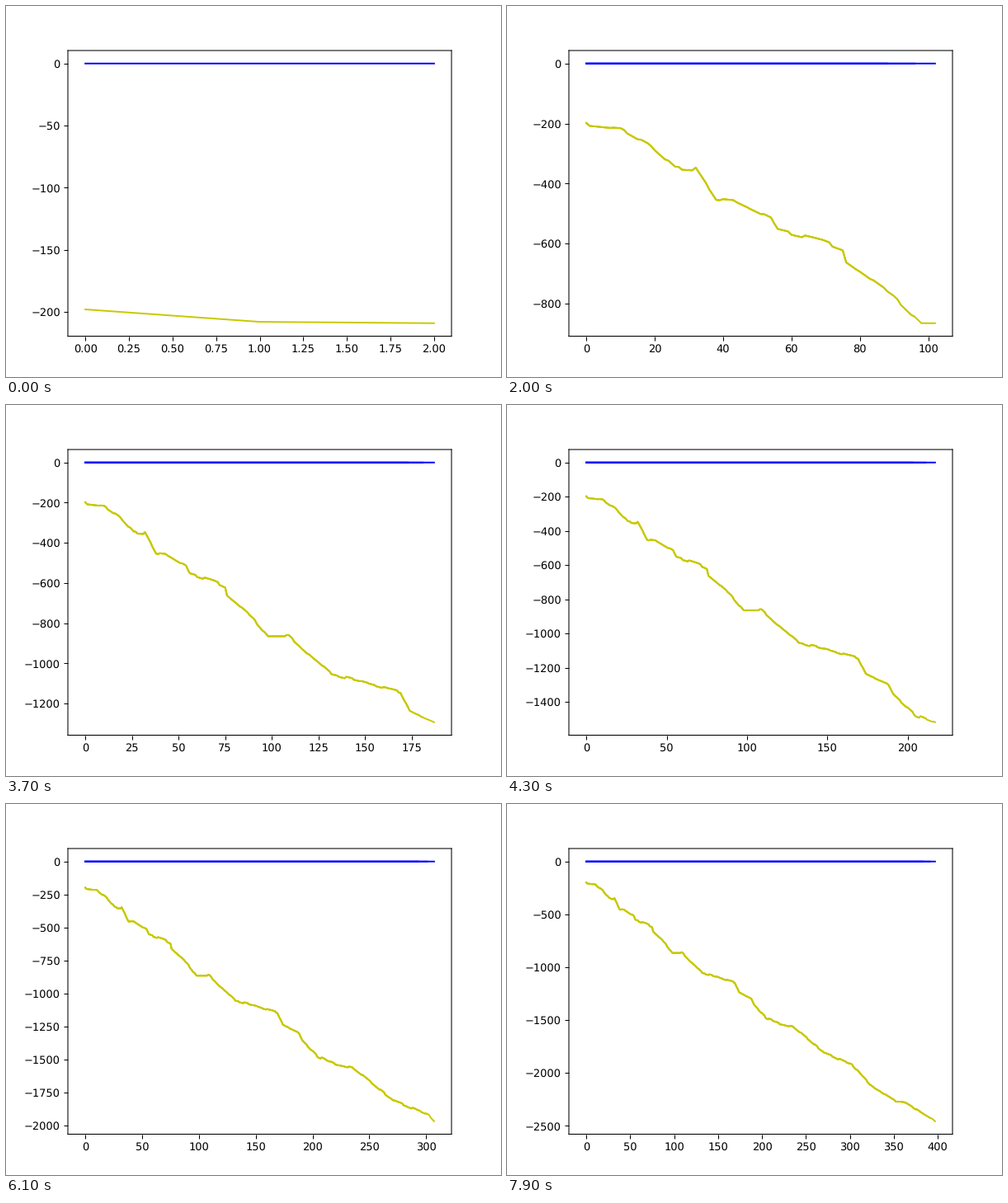
A matplotlib script for the animation above (8 s loop, 600 px wide and 450 px high).

```python
import numpy as np
import matplotlib.pyplot as plt
from matplotlib.animation import FuncAnimation

W, H, DPI = 600, 450, 93.75
FRAMES, INTERVAL = 80, 100
START, STEP = 3, 5          # samples at first, samples added per frame
TOTAL = START + STEP * (FRAMES - 1)
LAGS = (0, 6, 14)           # older copies of the plot that thicken its edges

# Turning points of the falling score: (sample, depth)
TURNS = [
    (0, 198), (1, 208), (10, 218), (18, 267), (26, 348), (32, 352),
    (38, 455), (44, 462), (54, 517), (56, 558), (69, 593), (75, 618),
    (76, 664), (90, 777), (98, 865), (109, 865), (132, 1055), (150, 1095),
    (169, 1143), (174, 1236), (187, 1289), (191, 1361), (205, 1479),
    (220, 1535), (236, 1568), (272, 1815), (302, 1916), (325, 2125),
    (352, 2264), (362, 2270), (397, 2457),
]


def make_score():
    x = np.arange(TOTAL)
    steps = np.random.default_rng(4).uniform(-7, 7, TOTAL // 4 + 1)
    rough = np.repeat(steps, 4)[:TOTAL] * np.clip((x - 2) / 20, 0, 1)
    return x, rough - np.interp(x, *zip(*TURNS))


plt.rcParams.update({"path.snap": False, "text.hinting": "none"})
x, score = make_score()

fig, ax = plt.subplots(figsize=(W / DPI, H / DPI), dpi=DPI)
fig.subplots_adjust(left=0.125, right=0.9, bottom=0.11, top=0.88)
zeros = [ax.plot([], [], color="b")[0] for _ in LAGS]
traces = [ax.plot([], [], color="#c8c800")[0] for _ in LAGS]


def update(i):
    n = START + STEP * i
    low = score[:n].min()
    ax.set_xlim(-0.05 * (n - 1), 1.05 * (n - 1))
    ax.set_ylim(1.05 * low, -0.05 * low)
    for lag, zero, trace in zip(LAGS, zeros, traces):
        m = max(n - lag, 0)
        zero.set_data(x[:m], np.zeros(m))
        trace.set_data(x[:m], score[:m])
    return zeros + traces


anim = FuncAnimation(fig, update, frames=FRAMES, interval=INTERVAL,
                     repeat=True, repeat_delay=0, blit=False)
plt.show()
```
